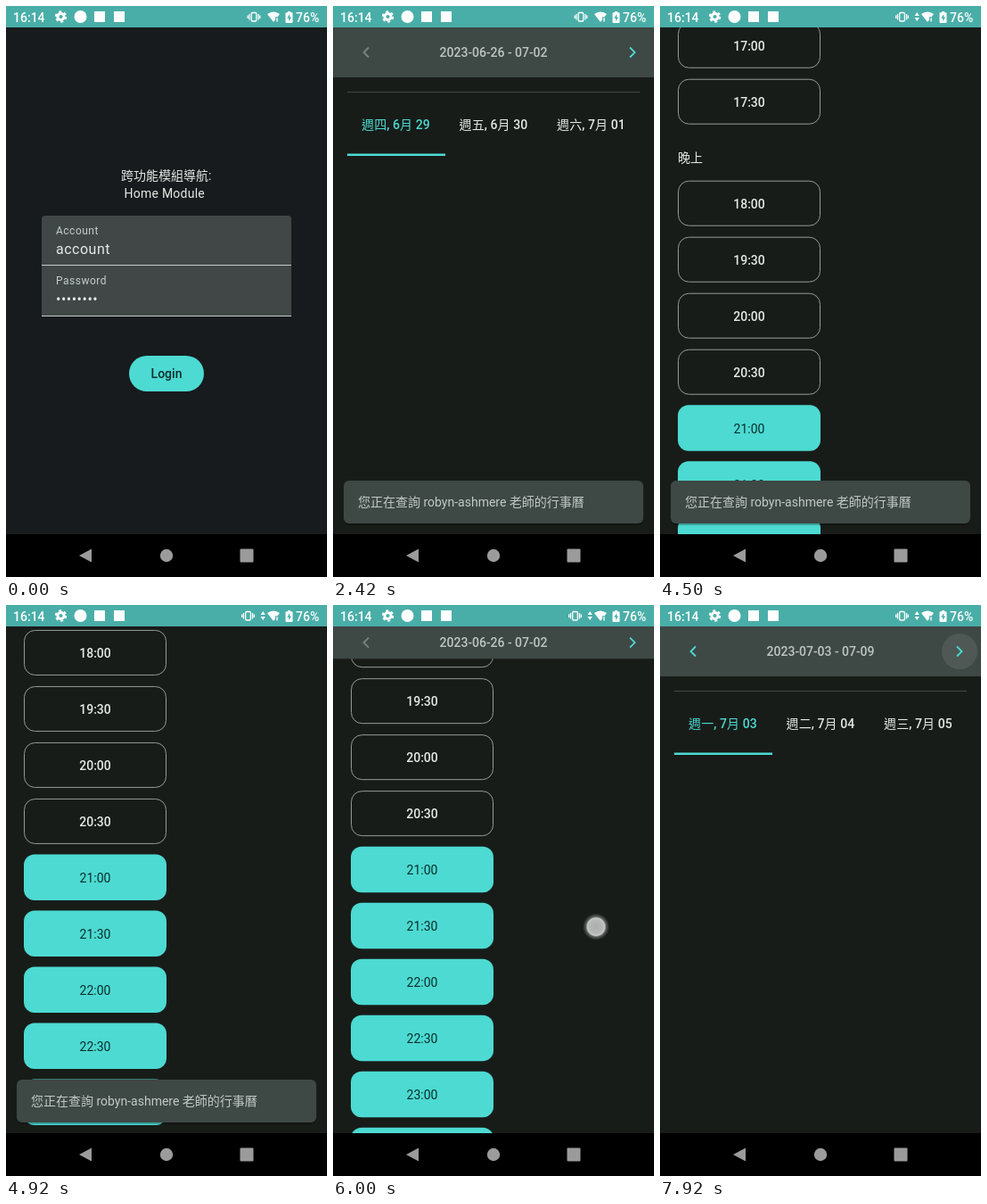
An HTML page for the animation above (8 s loop, 360 by 640 pixels).

```html
<!DOCTYPE html>
<html lang="zh-Hant">
<head>
<meta charset="utf-8">
<title>Booking calendar</title>
<style>
  html, body { margin: 0; width: 100%; height: 100%; overflow: hidden; background: #000; }
  #stage { display: block; width: 360px; height: 640px; }
  text { font: 400 14px Roboto, "Noto Sans CJK TC", "Noto Sans CJK", sans-serif; fill: #e4e9e6; }
  .bold { font-weight: 500; }
  .mid { text-anchor: middle; }
  .small { font-size: 12px; letter-spacing: .5px; fill: #c4cecb; }
  .input { font-size: 16px; letter-spacing: .5px; }
  .dark { fill: #0b2e2b; }
  .chevron { fill: none; stroke-width: 1.8; }
  #tabs { letter-spacing: .1px; }
  #ghost text { fill: #222c28; }
</style>
</head>
<body>
<svg id="stage" viewBox="0 0 360 640">
  <defs>
    <radialGradient id="dot">
      <stop offset="0" stop-color="#adafae"/>
      <stop offset=".5" stop-color="#b6b8b7"/>
      <stop offset=".66" stop-color="#c6c8c7"/>
      <stop offset=".76" stop-color="#7d807f" stop-opacity=".65"/>
      <stop offset="1" stop-color="#7d807f" stop-opacity="0"/>
    </radialGradient>
  </defs>

  <g id="login">
    <rect y="24" width="360" height="568" fill="#171b1d"/>
    <path d="M40 348V239a4 4 0 0 1 4-4H316a4 4 0 0 1 4 4V348Z" fill="#404746"/>
    <path d="M40 290.5H320M40 347.5H320" stroke="#c3cac8"/>
    <text x="129" y="195">跨功能模組導航:</text>
    <text x="132.5" y="215" letter-spacing=".25">Home Module</text>
    <text class="small" x="56" y="256">Account</text>
    <text class="input" x="56" y="278">account</text>
    <text class="small" x="56" y="312">Password</text>
    <text class="input" x="56" y="334">••••••••</text>
    <rect x="138" y="392" width="84" height="40" rx="20" fill="#4cdad2"/>
    <rect id="press" x="138" y="392" width="84" height="40" rx="20" fill="#003733"/>
    <text class="bold mid dark" x="180" y="417">Login</text>
  </g>

  <g id="page">
    <rect id="ground" y="24" width="360" height="568"/>
    <g id="ghost">
      <rect x="138" y="392" width="84" height="40" rx="20" fill="#48524e"/>
      <path d="M40 290.5H320M40 347.5H320" stroke="#26302c"/>
      <text x="129" y="195">跨功能模組導航:</text>
      <text x="132.5" y="215" letter-spacing=".25">Home Module</text>
      <text class="small" x="56" y="256">Account</text>
      <text class="input" x="56" y="278">account</text>
      <text class="small" x="56" y="312">Password</text>
      <text class="input" x="56" y="334">••••••••</text>
      <text class="bold mid" x="180" y="417">Login</text>
    </g>
    <svg id="listBox" width="360"><g id="list"></g></svg>
    <svg id="tabBox" width="360">
      <path d="M16 16.5H344" id="divider"/>
      <g id="tabs">
        <text class="bold mid" x="70.5" y="5" style="fill:#4cdad2"></text>
        <text class="bold mid" x="180" y="5"></text>
        <text class="bold mid" x="289.5" y="5"></text>
        <rect x="16" y="33" width="110" height="2.5" fill="#4cdad2"/>
      </g>
    </svg>
    <svg id="barBox" y="24" width="360">
      <rect id="barFill" width="360" height="56"/>
      <g id="bar">
        <circle id="ripple" cx="336" r="20" fill="#fff"/>
        <text id="range" class="bold mid" x="180" y="5" style="fill:#bec6c3"></text>
        <path id="prev" class="chevron" d="M40 -5.5L34.5 0L40 5.5"/>
        <path class="chevron" d="M333 -5.5L338.5 0L333 5.5" stroke="#4cdad2"/>
      </g>
    </svg>
    <g id="snack">
      <rect x="12" y="533" width="336" height="49" rx="6" fill="#000" opacity=".25"/>
      <rect x="12" y="532" width="336" height="48" rx="6" fill="#3e4845"/>
      <text x="28" y="561" style="fill:#c2cac7">您正在查詢 robyn-ashmere 老師的行事曆</text>
    </g>
  </g>

  <circle id="touch" r="15" fill="url(#dot)"/>

  <rect width="360" height="24" fill="#4aaea8"/>
  <g fill="#fff">
    <text class="bold" x="8" y="18" style="fill:#fff">16:14</text>
    <g fill="none" stroke="#fff">
      <circle cx="61.5" cy="12" r="3.6" stroke-width="3"/>
      <circle cx="61.5" cy="12" r="5.7" stroke-width="2" stroke-dasharray="3 2.97"/>
    </g>
    <circle cx="83.5" cy="12" r="7"/>
    <rect x="99" y="6" width="12" height="12"/>
    <rect x="121" y="6" width="12" height="12"/>
    <g id="vibrate" fill="none" stroke="#fff" stroke-width="1.3">
      <rect x="275.2" y="7.5" width="5.6" height="9.5" rx="1"/>
      <path d="M273 9V15.5M283 9V15.5M271.2 10.5V14M284.8 10.5V14"/>
    </g>
    <path id="traffic" d="M285.6 11L288.2 7L290.8 11ZM285.6 13L288.2 17L290.8 13Z"/>
    <path d="M293 9Q300 4 307 9L304.5 12.2H302V15.6L300 18Z"/>
    <path d="M304 13.2V17.5" stroke="#fff" stroke-width="1.4"/>
    <path d="M316 6H319V7.3H320.5a1 1 0 0 1 1 1V18a1 1 0 0 1-1 1H314.5a1 1 0 0 1-1-1V8.3a1 1 0 0 1 1-1H316Z"/>
    <path d="M318.3 9L315.2 13.8H317.2V17.2L320 12.4H318.3Z" fill="#4aaea8"/>
    <text class="bold" x="325" y="18" style="fill:#fff">76%</text>
  </g>
  <rect y="592" width="360" height="48"/>
  <g fill="#9b9b9b">
    <path d="M82 616L96 608.5V623.5Z"/>
    <circle cx="180" cy="616" r="7.2"/>
    <rect x="262.5" y="608.5" width="15" height="15" rx="1"/>
  </g>
</svg>

<script>
const LOOP = 8000, TOP = 24, BOTTOM = 592, BAR = 56, TABS = 104, PAD = 16, END = 525;
const el = {};
document.querySelectorAll('[id]').forEach(node => el[node.id] = node);

const set = (node, attrs) => {
  for (const key in attrs) node.setAttribute(key, attrs[key]);
};
const show = (node, alpha) => {
  set(node, { opacity: alpha, display: alpha > 0 ? 'inline' : 'none' });
};
const clamp = (v, lo = 0, hi = 1) => Math.min(hi, Math.max(lo, v));
const ramp = (t, a, b) => clamp((t - a) / (b - a));
const smooth = u => u * u * (3 - 2 * u);
const mix = (a, b, u) => `rgb(${a.map((v, i) => Math.round(v + (b[i] - v) * u))})`;
const between = (t, a, b) => t >= a && t < b;

// piecewise linear track of [time, value] points
function track(t, points) {
  let value = points[0][1];
  for (let i = 1; i < points.length; i++) {
    const [t0, v0] = points[i - 1], [t1, v1] = points[i];
    if (t >= t0) value = v0 + (v1 - v0) * ramp(t, t0, t1);
  }
  return value;
}

function slot(label, y, open) {
  const box = open
    ? `<rect x="20" y="${y - .5}" width="160" height="51.5" rx="12" fill="#4cdad2"/>`
    : `<rect x="20.5" y="${y + .5}" width="159" height="50" rx="12" fill="none" stroke="#929b98"/>`;
  return `${box}<text class="mid ${open ? 'dark' : 'bold'}" x="100" y="${y + 31}">${label}</text>`;
}

const PITCH = 63;
const noon = ['16:30', '17:00', '17:30'];
const night = ['18:00', '19:30', '20:00', '20:30', '21:00', '21:30', '22:00', '22:30', '23:00', '23:30'];
el.list.innerHTML =
  '<text class="small" x="20" y="213">您當地的時區: Asia/Taipei GMT +08:00</text>' +
  '<text x="20" y="247">下午</text><text x="20" y="487">晚上</text>' +
  noon.map((s, i) => slot(s, 268 + PITCH * i, i === 0)).join('') +
  night.map((s, i) => slot(s, 508 + PITCH * i, i > 3)).join('');

const weeks = [
  { range: '2023-06-26 - 07-02', days: ['週四, 6月 29', '週五, 6月 30', '週六, 7月 01'] },
  { range: '2023-07-03 - 07-09', days: ['週一, 7月 03', '週二, 7月 04', '週三, 7月 05'] }
];
const tabTexts = el.tabs.querySelectorAll('text');

const scrollDown = t => END * (1 - Math.pow(1 - ramp(t, 4080, 5330), 2.2));
const scrollBack = t => track(t, [[5740, 0], [6000, 36], [6580, 125], [6920, 168]]);

function touchAt(t) {
  if (between(t, 920, 1080)) return [184, 414];
  if (between(t, 4000, 4260)) return [232 + 8 * ramp(t, 4080, 4260), 510 - scrollDown(t)];
  if (between(t, 5670, 6260)) return [295, 324.5 + scrollBack(t)];
  if (between(t, 7580, 7720)) return [336, 52];
  return null;
}

function draw(t) {
  // sign-in and page change
  const enter = smooth(ramp(t, 1360, 1700));
  const settle = smooth(ramp(t, 1750, 2250));
  show(el.login, enter < 1 ? 1 : 0);
  show(el.page, enter);
  show(el.press, .16 * ramp(t, 920, 1080) * (1 - ramp(t, 1180, 1400)));
  show(el.ghost, .4 * (1 - ramp(t, 1750, 2080)));
  set(el.ground, { fill: mix([50, 61, 57], [24, 28, 25], settle) });
  set(el.barFill, { fill: mix([88, 97, 93], [62, 72, 69], settle) });
  set(el.divider, { stroke: mix([104, 113, 109], [63, 73, 70], settle) });

  // scroll offset and floating headers
  const down = scrollDown(t), back = scrollBack(t), offset = down - back;
  const shown = clamp(t < 5500 ? BAR + TABS - down : back, 0, BAR + TABS);
  const barH = t < 5500 ? clamp(BAR - down, 0, BAR) : clamp(back, 0, BAR);
  const tabH = shown - barH, tabY = TOP + barH, listY = tabY + tabH;
  const tabClip = Math.max(0, tabH - PAD);
  set(el.barBox, { height: barH, display: barH > 0 ? 'inline' : 'none' });
  set(el.bar, { transform: `translate(0 ${barH / 2})` });
  set(el.tabBox, { y: tabY, height: tabClip, display: tabClip > 0 ? 'inline' : 'none' });
  set(el.tabs, { transform: `translate(0 ${(tabH + 1) / 2})` });
  set(el.listBox, { y: listY, height: BOTTOM - listY });
  set(el.list, { transform: `translate(0 ${-offset - listY})` });

  // week contents
  const next = t >= 7700, week = weeks[next ? 1 : 0];
  show(el.list, between(t, 2920, 7700) ? 1 : 0);
  el.range.textContent = week.range;
  tabTexts.forEach((node, i) => node.textContent = week.days[i]);
  set(el.prev, { stroke: next ? '#4cdad2' : '#7c8582' });
  show(el.ripple, .085 * ramp(t, 7580, 7720));

  show(el.snack, smooth(ramp(t, 1830, 2080)) * (1 - ramp(t, 5670, 5880)));

  const busy = t >= 2920;
  show(el.traffic, busy ? 1 : 0);
  set(el.vibrate, { transform: `translate(${busy ? -6.5 : 0} 0)` });

  const touch = touchAt(t);
  show(el.touch, touch ? 1 : 0);
  if (touch) set(el.touch, { cx: touch[0], cy: touch[1] });
}

const start = performance.now();
function tick() {
  draw((performance.now() - start) % LOOP);
  requestAnimationFrame(tick);
}
tick();
</script>
</body>
</html>
```
